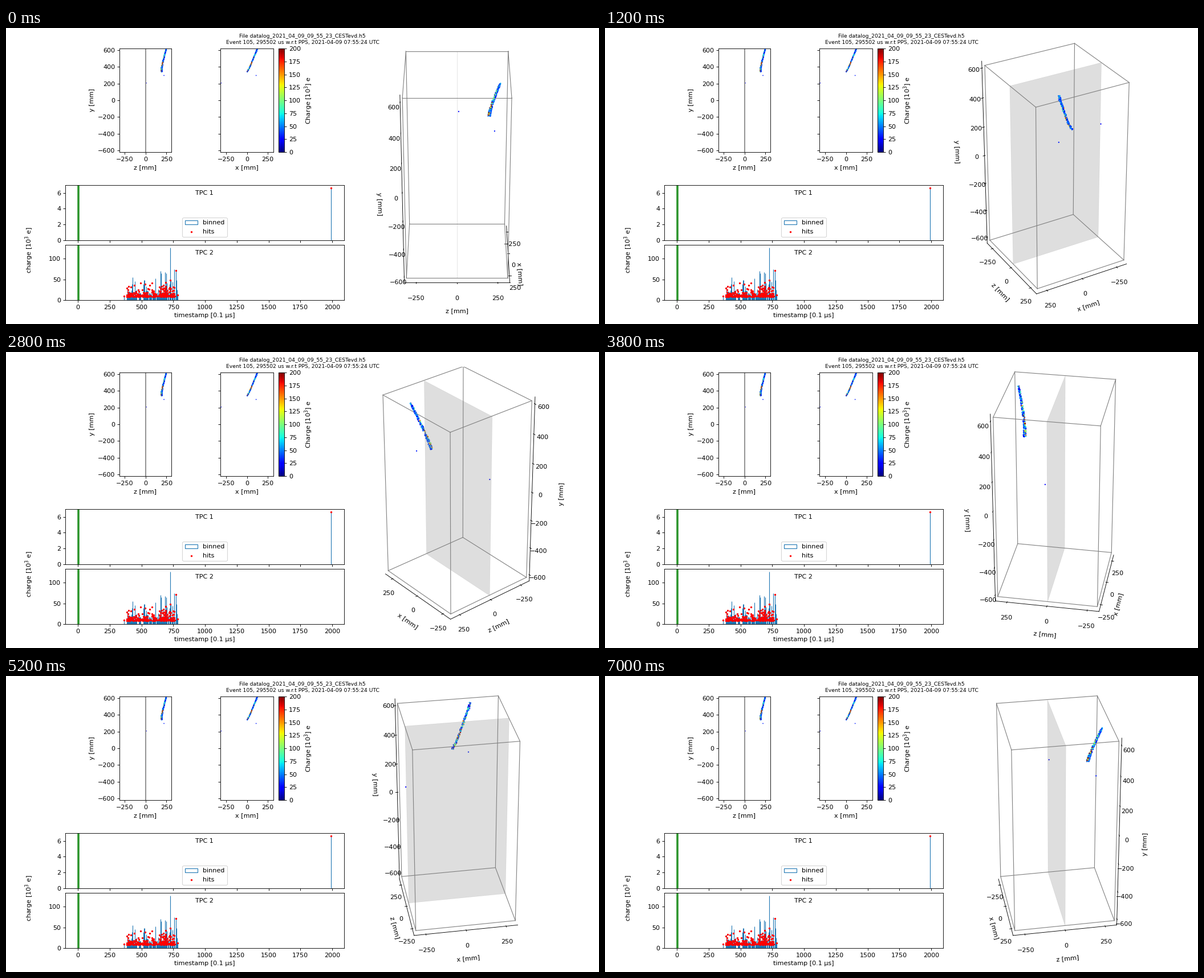
Animation of 1040x520 px, one loop 7.2 s. Source, as a matplotlib script:

```python
from itertools import combinations, product

import numpy as np
import matplotlib.pyplot as plt
from matplotlib.animation import FuncAnimation
from matplotlib.patches import Patch
from mpl_toolkits.mplot3d.art3d import Poly3DCollection

W, H, DPI = 1040, 520, 80
FRAMES, INTERVAL = 36, 200
HALF_X, HALF_Y, HALF_Z = 310, 620, 310
MARGIN = 25 / 24

plt.rcParams.update({"font.family": "DejaVu Sans", "font.size": 10})
rng = np.random.default_rng(12)
fig = plt.figure(figsize=(W / DPI, H / DPI), dpi=DPI, facecolor="white")


def add_axes(left, top, right, bottom, **kwargs):
    """Add axes given by their pixel edges, measured from the top left."""
    box = [left / W, 1 - bottom / H, (right - left) / W, (bottom - top) / H]
    return fig.add_axes(box, **kwargs)


def make_track(n=290):
    """A slightly bent track; late hits (larger z) carry less charge."""
    t = rng.uniform(0, 1, n)
    spread = rng.uniform(-1, 1, n)
    x = 5 + 120 * t**0.93 + rng.normal(0, 2.5, n)
    y = 340 + 277 * t + rng.normal(0, 2, n)
    z = 191 + 59 * t**1.4 + spread * (8.5 - 5 * t)
    early = 22 + rng.exponential(68, n) * (1.15 - 0.5 * t)
    late = rng.uniform(18, 62, n)
    charge = np.where(spread > 0.1, late, early)
    return x, y, z, np.clip(charge, 12, 195)


def add_isolated(track):
    extra = [(-310, 110), (207, 297), (10, 222), (22, 30)]
    return [np.append(a, b) for a, b in zip(track, extra)]


x, y, z, charge = add_isolated(make_track())
colors = dict(c=charge, cmap="jet", vmin=0, vmax=200)

fig.suptitle("File datalog_2021_04_09_09_55_23_CESTevd.h5\n"
             "Event 105, 295502 us w.r.t PPS, 2021-04-09 07:55:24 UTC",
             fontsize="small", y=0.98)

# Flat projections
ax_zy = add_axes(199, 36, 290, 218)
ax_xy = add_axes(376, 36, 469, 218)
for ax, u, name, lim in ((ax_zy, z, "z", 310), (ax_xy, x, "x", 317)):
    dots = ax.scatter(u, y, s=1, linewidths=0.5, **colors)
    ax.set(xlim=(-lim, lim), ylim=(-HALF_Y, HALF_Y), xlabel=f"{name} [mm]",
           xticks=(-250, 0, 250), yticks=range(-600, 601, 200))
ax_zy.set_ylabel("y [mm]")
ax_zy.axvline(0, color="gray")
ax_xy.tick_params(labelleft=False)
cbar = fig.colorbar(dots, cax=add_axes(478, 36, 488, 218),
                    ticks=range(0, 201, 25))
cbar.set_label("Charge [$10^3$] e")

# Charge against time
ax_t1 = add_axes(104, 276, 593, 373)
ax_t2 = add_axes(104, 381, 593, 478)
bar_style = dict(color="C0", lw=1)
hit_style = dict(s=4, color="red", zorder=3)

ax_t1.vlines(1991, 0, 6.65, **bar_style)
hits = ax_t1.scatter([1991], [6.65], **hit_style)

bins = np.arange(364, 786, 4)
binned = 8 + rng.exponential(13, bins.size) * (0.8 + (bins > 630) * 0.5)
binned = np.clip(binned, 0, 48) * (rng.random(bins.size) < 0.82)
binned[bins < 384] = 0
tall = {365: 9, 430: 55, 448: 45, 612: 52, 648: 70, 657: 64, 684: 67,
        697: 64, 726: 126.7, 756: 74, 770: 71, 783: 13}
for time, value in tall.items():
    binned[(time - 362) // 4] = value
ax_t2.vlines(bins, 0, binned, **bar_style)

times = np.append(rng.uniform(384, 765, 210), rng.uniform(640, 765, 45))
heights = 8.5 + rng.exponential(2.8, times.size)
high = rng.random(times.size) < 0.1 + 0.2 * (times > 630)
heights[high] += rng.uniform(4, 22, high.sum())
heights = np.minimum(heights, 42)
peaks = {365: 9.5, 386: 29, 394: 25, 446: 36, 492: 41, 530: 39, 582: 41,
         692: 43, 726: 48, 751: 32, 770: 71, 783: 13}
ax_t2.scatter(np.append(times, list(peaks)),
              np.append(heights, list(peaks.values())), **hit_style)

panels = ((ax_t1, "TPC 1", 6.98, (0, 2, 4, 6)),
          (ax_t2, "TPC 2", 133, (0, 50, 100)))
for ax, name, top, ticks in panels:
    ax.axvline(3, color="#2a942a", lw=3.2)
    ax.text(0.498, 0.82, name, transform=ax.transAxes, ha="center")
    ax.set(xlim=(-98.7, 2094), ylim=(0, top), yticks=ticks,
           xticks=range(0, 2001, 250))
ax_t1.legend([Patch(fill=False, edgecolor="C0"), hits], ["binned", "hits"],
             loc="lower center")
ax_t2.set_xlabel("timestamp [0.1 μs]")
fig.text(40.5 / W, 1 - 390 / H, "charge [$10^3$ e]", rotation=90,
         ha="center", va="center")

# Rotating detector: the vertical axis shows y
ax3d = add_axes(564.1, 26, 1006.1, 468, projection="3d")
ax3d.patch.set_visible(False)
ax3d.grid(False)
ax3d.set_box_aspect((1, 1, 2))
ax3d.set(xlim=(-HALF_X * MARGIN, HALF_X * MARGIN),
         ylim=(-HALF_Z * MARGIN, HALF_Z * MARGIN),
         zlim=(-HALF_Y * MARGIN, HALF_Y * MARGIN),
         xlabel="x [mm]", ylabel="z [mm]",
         xticks=(-250, 0, 250), yticks=(-250, 0, 250),
         zticks=range(-600, 601, 200))
ax3d.set_zlabel("y [mm]", labelpad=20)
for axis in (ax3d.xaxis, ax3d.yaxis, ax3d.zaxis):
    axis.set_pane_color((1, 1, 1, 0))

corners = product((-HALF_X, HALF_X), (-HALF_Z, HALF_Z), (-HALF_Y, HALF_Y))
for a, b in combinations(corners, 2):
    if sum(p != q for p, q in zip(a, b)) == 1:
        ax3d.plot(*zip(a, b), color="gray", lw=1)

cathode = [(sx * HALF_X, 0, sy * HALF_Y)
           for sx, sy in ((-1, -1), (1, -1), (1, 1), (-1, 1))]
ax3d.add_collection3d(Poly3DCollection(
    [cathode], facecolors=[(0.5, 0.5, 0.5, 0.26)],
    edgecolors=[(0.5, 0.5, 0.5, 0.2)], linewidths=0.5))
ax3d.scatter(x, z, y, s=1, depthshade=False, **colors)


def update(frame):
    ax3d.view_init(elev=30, azim=frame * 360 / FRAMES)
    return []


anim = FuncAnimation(fig, update, frames=FRAMES, interval=INTERVAL,
                     init_func=lambda: update(0), repeat=True, repeat_delay=0)
plt.show()
```
